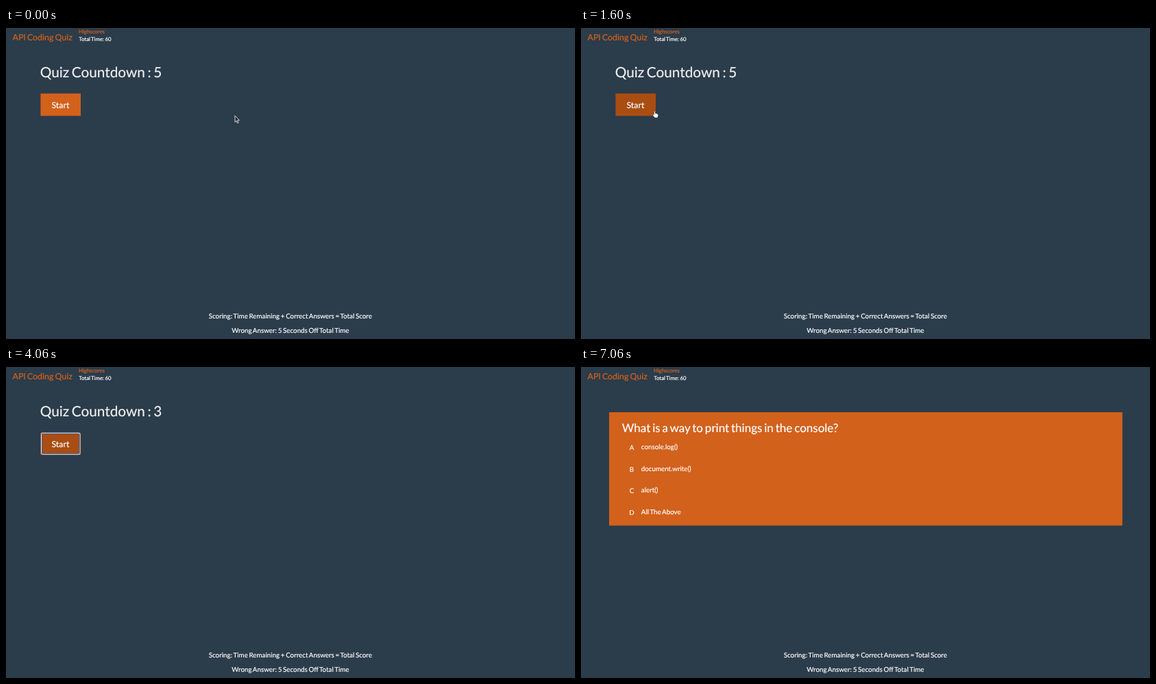
An HTML page for the animation above (8000 ms loop, 830x454 px).

```html
<!DOCTYPE html>
<html lang="en">
<head>
<meta charset="utf-8">
<title>API Coding Quiz</title>
<style>
  html, body { margin: 0; width: 100%; height: 100%; overflow: hidden; background: #2b3c4b; }
  svg { display: block; width: 100%; height: 100%; }
  text {
    font-family: Lato, sans-serif; word-spacing: -.085em; text-rendering: geometricPrecision;
    fill: #fff; stroke: #fff; stroke-width: .2px;
  }
  .orange { fill: #d2611c; }
  text.orange { stroke: #d2611c; }
  .brand { font-size: 12.4px; }
  .small { font-size: 7.85px; }
  .heading { font-size: 20.8px; fill: #f0f0f0; stroke: #f0f0f0; }
  .button { font-size: 12.4px; }
  .question { font-size: 17px; }
  .body { font-size: 9.8px; }
  .middle { text-anchor: middle; }
  .ring { fill: none; }
</style>
</head>
<body>
<svg viewBox="0 0 830 454">
  <text class="brand orange" x="9.5" y="18">API Coding Quiz</text>
  <text class="small orange" x="106" y="8.4">Highscores</text>
  <text class="small" x="106.3" y="19.2">Total Time: 60</text>

  <g id="intro">
    <text id="countdown" class="heading" x="49.7" y="71.6"></text>
    <rect id="start" x="50.4" y="95.6" width="58.6" height="32.7"/>
    <g id="focus" class="ring">
      <rect x="51.5" y="96.4" width="56.5" height="31.2" rx="2" stroke="#fff"/>
      <rect x="52.4" y="97.3" width="54.7" height="29.4" rx="1.2" stroke="#1a66c0"/>
    </g>
    <text class="button middle" x="79.4" y="116.7">Start</text>
  </g>

  <g id="quiz">
    <rect class="orange" x="41" y="66" width="748.7" height="165.5"/>
    <text class="question" x="59.8" y="95.1">What is a way to print things in the console?</text>
    <g id="answers"></g>
  </g>

  <text class="body middle" x="414.8" y="423.9">Scoring: Time Remaining + Correct Answers = Total Score</text>
  <text class="body middle" x="414.9" y="444.5">Wrong Answer: 5 Seconds Off Total Time</text>

  <path id="arrow" d="M0 0V9.3L2.1 7.4L3.6 10.8L5.1 10.1L3.6 6.8H6.5Z" fill="#222c35" stroke="#fff" stroke-width=".8"/>
  <path id="hand" transform="translate(104.5 121)" fill="#fff" stroke="#26303a" stroke-width=".5"
    d="M2 5.6V1.1Q2 .2 2.8 .2T3.6 1.1V3.6Q5 3.1 5.3 4Q6.4 3.6 6.7 4.5Q8 4.2 8 5.6V7.4L7 10H3.1L.4 6.7Q0 5.5 1 5.3Z"/>
</svg>
<script>
const LOOP = 8000;
const $ = id => document.getElementById(id);
const clamp = (v, lo = 0, hi = 1) => Math.min(hi, Math.max(lo, v));
const show = (id, on) => $(id).setAttribute("visibility", on ? "visible" : "hidden");

$("answers").innerHTML = ["console.log()", "document.write()", "alert()", "All The Above"]
  .map((answer, i) => {
    const y = 120.9 + i * 31.6;
    return `<text class="body middle" x="74" y="${y}">${"ABCD"[i]}</text>
      <text class="body" x="87.8" y="${y - 1}">${answer}</text>`;
  }).join("");

const steps = (t, start, interval, count) =>
  clamp(Math.floor((t - start) / interval) + 1, 0, count) / count;

function arrowPosition(t) {
  const sweep = steps(t, 60, 67.5, 12);
  const settle = steps(t, 930, 65, 3);
  return [334 - 221 * (1 - (1 - sweep) ** 1.48) - 4 * settle, 128 - 7.5 * sweep];
}

function buttonColor(t) {
  const u = steps(t, 1260, 67.5, 5);
  const hover = u * u * (3 - 2 * u);
  const mix = (from, to) => Math.round(from + (to - from) * hover);
  return `rgb(${mix(210, 169)}, ${mix(97, 77)}, ${mix(28, 18)})`;
}

function draw(t) {
  const quiz = t >= 7060;
  const count = 5 - clamp(Math.floor((t - 2060) / 1000), 0, 4);
  $("countdown").textContent = `Quiz Countdown : ${count}`;
  $("start").setAttribute("fill", buttonColor(t));
  $("arrow").setAttribute("transform", `translate(${arrowPosition(t)})`);
  show("intro", !quiz);
  show("quiz", quiz);
  show("focus", t >= 2000 && !quiz);
  show("arrow", t < 1260);
  show("hand", t >= 1260 && t < 3530);
}

const origin = performance.now();
function tick() {
  draw((performance.now() - origin) % LOOP);
  requestAnimationFrame(tick);
}
tick();
</script>
</body>
</html>
```
